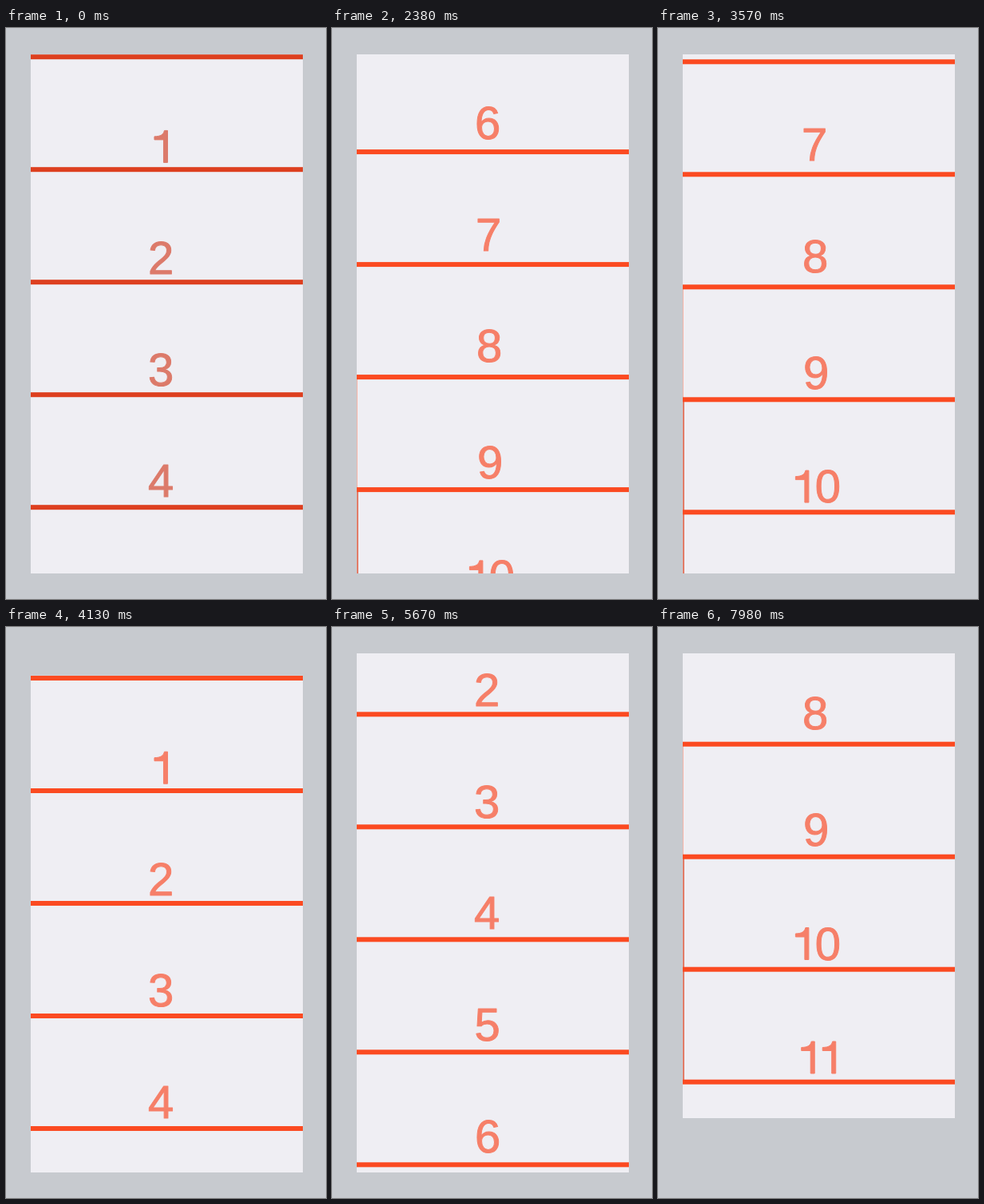
These frames come from a looping animation (401x715 px, 8 s). An HTML page with a canvas:

```html
<!DOCTYPE html>
<html>
<head>
<meta charset="utf-8">
<style>
html, body { margin: 0; width: 100%; height: 100%; overflow: hidden; background: #c7cacf; }
canvas { display: block; }
</style>
</head>
<body>
<canvas id="stage" width="401" height="715"></canvas>
<script>
const ctx = document.getElementById('stage').getContext('2d');
const LOOP = 8000, STEP = 70;
const LEFT = 31, TOP = 33, WIDTH = 341, HEIGHT = 650, LIST_END = 1632.5;
const CELLS = 11, GAP = 9;

// Scroll poses: time, offset
const poses = [
  [0, 0], [1835, 0], [2690, 976], [2970, 949], [3400, 949], [4060, -28],
  [4820, 0], [4900, 0], [6700, 570], [7560, 570], [7980, 1017.5], [LOOP, 1017.5]
];

const ease = u => u * u * u * (10 - 15 * u + 6 * u * u);
const mix = (a, b, k) => `rgb(${a.map((c, i) => Math.round(c + (b[i] - c) * k))})`;
const ruleY = n => 36.2 + 141 * n;
const labelX = n => 194 + 0.1 * (n - 2.5) ** 2;
// The last three numerals sit a little lower in their cells
const labelY = n => n < 9 ? 28.8 + 139.6 * n : 1291.5 + 142.5 * (n - 9);
const inkWidth = c => c === '1' ? 17.5 : 29;

function scrollAt(t) {
  const i = poses.findIndex(p => p[0] > t);
  const [t0, a] = poses[i - 1], [t1, b] = poses[i];
  return a + (b - a) * ease((t - t0) / (t1 - t0));
}

// Footless numeral one, x at its right edge
function drawOne(x, y) {
  ctx.beginPath();
  ctx.moveTo(x, y);
  ctx.lineTo(x - 5, y);
  ctx.lineTo(x - 5, y - 28.5);
  ctx.lineTo(x - 16.5, y - 28.5);
  ctx.lineTo(x - 16.5, y - 32.5);
  ctx.bezierCurveTo(x - 8.5, y - 32.7, x - 5.2, y - 35, x - 4, y - 40);
  ctx.lineTo(x, y - 40);
  ctx.closePath();
  ctx.fill();
  ctx.stroke();
}

function drawLabel(n) {
  const chars = [...String(n)], y = labelY(n);
  const total = chars.reduce((sum, c) => sum + inkWidth(c) + GAP, -GAP);
  let x = labelX(n) - total / 2;
  for (const c of chars) {
    const w = inkWidth(c);
    if (c === '1') {
      drawOne(x + w - 0.5, y);
    } else {
      ctx.fillText(c, x + w / 2, y);
      ctx.strokeText(c, x + w / 2, y);
    }
    x += w + GAP;
  }
}

function draw(t) {
  const warm = Math.min(1, t / 1260);

  ctx.fillStyle = '#c7cacf';
  ctx.fillRect(0, 0, 401, 715);
  ctx.save();
  ctx.beginPath();
  ctx.rect(LEFT, TOP, WIDTH, HEIGHT);
  ctx.clip();
  ctx.translate(0, -scrollAt(t));

  ctx.fillStyle = '#efeef3';
  ctx.fillRect(LEFT, TOP, WIDTH, LIST_END - TOP);

  // Edge beside the last three cells
  ctx.fillStyle = '#f5b5a8';
  ctx.fillRect(LEFT, ruleY(8), 1, ruleY(11) - ruleY(8));
  ctx.fillStyle = '#d9553a';
  ctx.fillRect(LEFT + 0.5, ruleY(9), 1.3, ruleY(11) - ruleY(9));

  ctx.fillStyle = mix([221, 63, 31], [251, 74, 33], warm);
  for (let n = 0; n <= CELLS; n++) ctx.fillRect(LEFT, ruleY(n) - 3, WIDTH, 6);

  ctx.fillStyle = ctx.strokeStyle = mix([220, 122, 106], [246, 127, 104], warm);
  ctx.lineWidth = 1;
  ctx.lineJoin = 'round';
  ctx.font = '58px "Liberation Sans", Arial, sans-serif';
  ctx.textAlign = 'center';
  for (let n = 1; n <= CELLS; n++) drawLabel(n);
  ctx.restore();
}

function tick() {
  const t = performance.now() % LOOP;
  draw(Math.floor(t / STEP) * STEP);
  requestAnimationFrame(tick);
}
tick();
</script>
</body>
</html>
```
